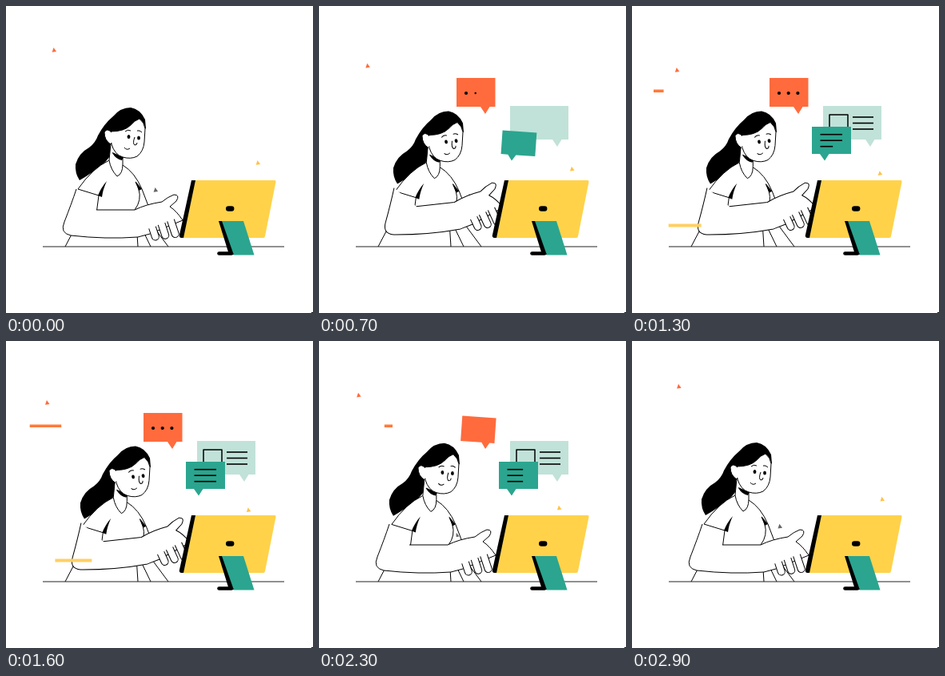
Animation of 384 by 384 pixels, one loop 3 s. Source, as an HTML page with a canvas:

```html
<!DOCTYPE html>
<html lang="en">
<head>
<meta charset="utf-8">
<title>Chat at the desk</title>
<style>
  html, body { margin: 0; height: 100%; overflow: hidden; background: #fff; }
  canvas { display: block; width: 100vmin; height: 100vmin; }
</style>
</head>
<body>
<canvas id="stage" width="384" height="384"></canvas>
<script>
const ctx = document.getElementById('stage').getContext('2d');
const LOOP = 3000, STEP = 100;
const INK = '#000', WHITE = '#fff', ORANGE = '#ff6b3d', YELLOW = '#ffd24a', GREEN = '#2ba58f', MINT = '#c1e2d8';

const progress = (t, start, length) => Math.min(1, Math.max(0, (t - start) / length));
const smooth = p => p * p * (3 - 2 * p);
const easeOut = p => 1 - (1 - p) ** 2;
const mix = (a, b, k) => a + (b - a) * k;

// Eased 0 to 1 and back to 0
const visit = (t, on, off, length) => smooth(progress(t, on, length)) - smooth(progress(t, off, length));
// Quick linear fade-in and fade-out of a length
const reveal = (t, on, off) => Math.min(progress(t, on, 175), 1 - progress(t, off, 175));

function draw(d, fill, stroke, width = 1) {
  const path = new Path2D(d);
  if (fill) { ctx.fillStyle = fill; ctx.fill(path); }
  if (stroke) { ctx.strokeStyle = stroke; ctx.lineWidth = width; ctx.stroke(path); }
}

function dot(x, y, rx, ry = rx) {
  ctx.fillStyle = INK;
  ctx.beginPath();
  ctx.ellipse(x, y, rx, ry, 0, 0, 7);
  ctx.fill();
}

function bar(x0, x1, y, width, color) {
  if (x1 - x0 > 0.3) draw(`M${x0} ${y}H${x1}`, null, color, width);
}

// Paints around a local origin
function at(x, y, angle, paint, scale = 1) {
  ctx.save();
  ctx.translate(x, y);
  ctx.rotate(angle);
  ctx.scale(scale, scale);
  paint();
  ctx.restore();
}

// Paints in stage coordinates, moved by dx, dy and turned about a pivot
function move(dx, dy, paint, angle = 0, px = 0, py = 0, scale = 1) {
  at(px + dx, py + dy, angle, () => { ctx.translate(-px, -py); paint(); }, scale);
}

function hair() {
  draw('M134 138Q143 127 156 127Q168 129 174 142L175 153L140 180L131 186Q126 195 115 203Q101 213 92 218Q86 209 87 198Q91 184 104 177Q112 171 115 162Q123 147 134 138Z', INK);
}

function torso() {
  draw('M170 250Q173 240 166 223Q157 206 146 199L129 193Q108 203 90 229L116 237L113 262', WHITE);
  draw('M161 255Q170 243 166 229L162 220M178 250L170 229Q161 208 146 199M129 193Q108 203 90 229L116 237L113 260', null, INK);
  draw('M131 172L129 193Q131 205 139 213Q146 210 146 198V186', WHITE, INK);
  draw('M133 183L147 189L145 193Q138 192 133 184Z', INK);
  draw('M126 219Q121 230 120 239L115 237Q119 227 126 219ZM162 219L170 229L166 231Z', INK);
}

function face() {
  draw('M131 157Q148 157 156 149Q161 143 167 141Q173 146 174 153L173 170Q172 182 164 188Q156 192 146 189Q136 186 132 173Z', WHITE, INK);
  draw('M132 158Q126 152 123 158Q123 168 131 173', WHITE, INK);
  draw('M130 159H134V171H131Z', WHITE);
}

function features() {
  dot(153.5, 163.5, 1.9, 2.5);
  dot(166, 165, 1.9, 2.5);
  draw('M149 157Q152 154 156 156M164 156Q167 155 170 158M161 164Q158 172 161 174Q164 174 164 171M148 177Q151 181 155 178', null, INK);
}

function arm() {
  draw('M88 229Q82 247 73 270Q67 284 81 287Q125 292 165 289L180 285L221 268Q213 256 205 251L213 244Q218 236 210 236Q202 239 195 245Q175 248 161 255H113', WHITE, INK);
  for (let i = 0; i < 3; i++) {
    const len = 12 + 3 * i;
    at(183 + 11.5 * i, 277 - 4.5 * i, -0.32, () => draw(`M-4.5 0V${len}A4.5 4.5 0 0 0 4.5 ${len}V0`, WHITE, INK));
  }
}

function drawFigure(t) {
  const lean = visit(t, 0, 2000, 400);
  const reach = visit(t, 0, 1710, 400);
  const dx = 6 * lean, dy = 4.5 * lean;
  move(dx, dy, hair);
  draw('M85 280L74 301M163 270L165 301M166 270L181 301M180 270L203 301', null, INK);
  move(5.3 * lean, 2.7 * lean, torso);
  move(dx, dy, face);
  move(5.5 * lean, 5 * lean, features, -0.22 * lean, 160, 164);
  move(11 * reach, 0, arm, -0.108 * reach, 72, 275);
}

// Speech bubble that grows out of its tail tip
function bubble(t, on, off, x, y, l, top, w, h, color) {
  const size = 1 - (1 - progress(t, on, 200)) ** 3 - progress(t, off, 200) ** 3;
  if (size <= 0) return;
  const r = l + w, b = top + h;
  const shape = `M${l} ${top}H${r}V${b}H${x + 5.5}L${x} ${y}L${x - 6} ${b}H${l}Z`;
  move(0, 0, () => draw(shape, color), (1 - size) * 0.55, x, y, size);
}

// Three lines of writing, each starting a little after the one above
function writing(t, x, y, width, delay, off) {
  for (let i = 0; i < 3; i++) bar(x, x + width * reveal(t, 900 + delay * i, off), y + 7.5 * i, 1.6, INK);
}

function drawBubbles(t) {
  bubble(t, 300, 2200, 208, 135, 172, 90, 48.5, 36, ORANGE);
  for (let i = 0; i < 3; i++) dot(184 + 11.7 * i, 109, 2.1 * Math.max(0, reveal(t, 500 + 100 * i, 2100)));

  bubble(t, 390, 2550, 298, 176, 239, 125, 73, 42, MINT);
  const edge = reveal(t, 700, 2300);
  if (edge > 0) {
    ctx.setLineDash([92 * edge, 200]);
    draw('M247 136H270V157H247Z', null, INK, 1.5);
    ctx.setLineDash([]);
  }
  writing(t, 276, 139, 26, 0, 2300);

  bubble(t, 600, 2400, 241, 193.5, 225, 151, 49, 34, GREEN);
  writing(t, 235.5, 160.7, 27.5, 150, 2250);
}

function drawMonitor() {
  draw('M232 218H238L223 290H219Q216 289 217 286Z', INK);
  draw('M237 218H336Q338 218 337.5 220L324 288Q323.5 290 322 290H222Z', YELLOW);
  draw('M266 269H273L287 311H279Z', INK);
  ctx.lineCap = 'round';
  bar(278.2, 282.2, 253.5, 6.4, INK);
  bar(266.5, 282, 309.5, 4.6, INK);
  ctx.lineCap = 'butt';
  draw('M270 269H297L310.5 311.5H285Z', GREEN);
}

// Triangle that drifts round a three-cornered path, one side per second
function spark(t, x, y, corners, color) {
  const side = Math.floor(t / 1000), k = t % 1000 / 1000;
  const [ax, ay] = corners[side], [bx, by] = corners[(side + 1) % 3];
  at(x + mix(ax, bx, k), y + mix(ay, by, k), -0.15, () => draw('M0 -3L2.8 2.4H-2.8Z', color));
}

// Line whose front slows down while its tail catches up
function sweep(t, start, length, x0, x1, y, width, color) {
  const front = easeOut(progress(t, start, length));
  const tail = progress(t, start + 200, length) ** 2;
  bar(mix(x0, x1, tail), mix(x0, x1, front), y, width, color);
}

function render(t) {
  const shortPath = [[0, 0], [2, 11], [-21, 18]], longPath = [[0, 0], [1, 28], [-15, 18]];
  ctx.fillStyle = WHITE;
  ctx.fillRect(0, 0, 384, 384);
  ctx.lineJoin = 'round';

  spark(t, 187, 230, shortPath, '#666');
  drawFigure(t);
  draw('M46 301H348', null, '#222');
  drawMonitor();
  spark(t, 315, 196, shortPath, '#ffc247');
  spark(t, 60, 55, longPath, ORANGE);
  drawBubbles(t);

  sweep(t, 750, 250, 277, 331, 200, 4.5, '#6b6b6b');
  sweep(t, 965, 860, 44, 112, 274.5, 4, '#ffcf63');
  sweep(t, 1200, 980, 27, 92, 106.3, 3.6, '#ff7a3a');

  ctx.fillStyle = INK;
  ctx.fillRect(382, 383, 2, 1);
}

const start = performance.now();
function tick() {
  const elapsed = (performance.now() - start) % LOOP;
  render(Math.floor(elapsed / STEP) * STEP);
  requestAnimationFrame(tick);
}
tick();
</script>
</body>
</html>
```
